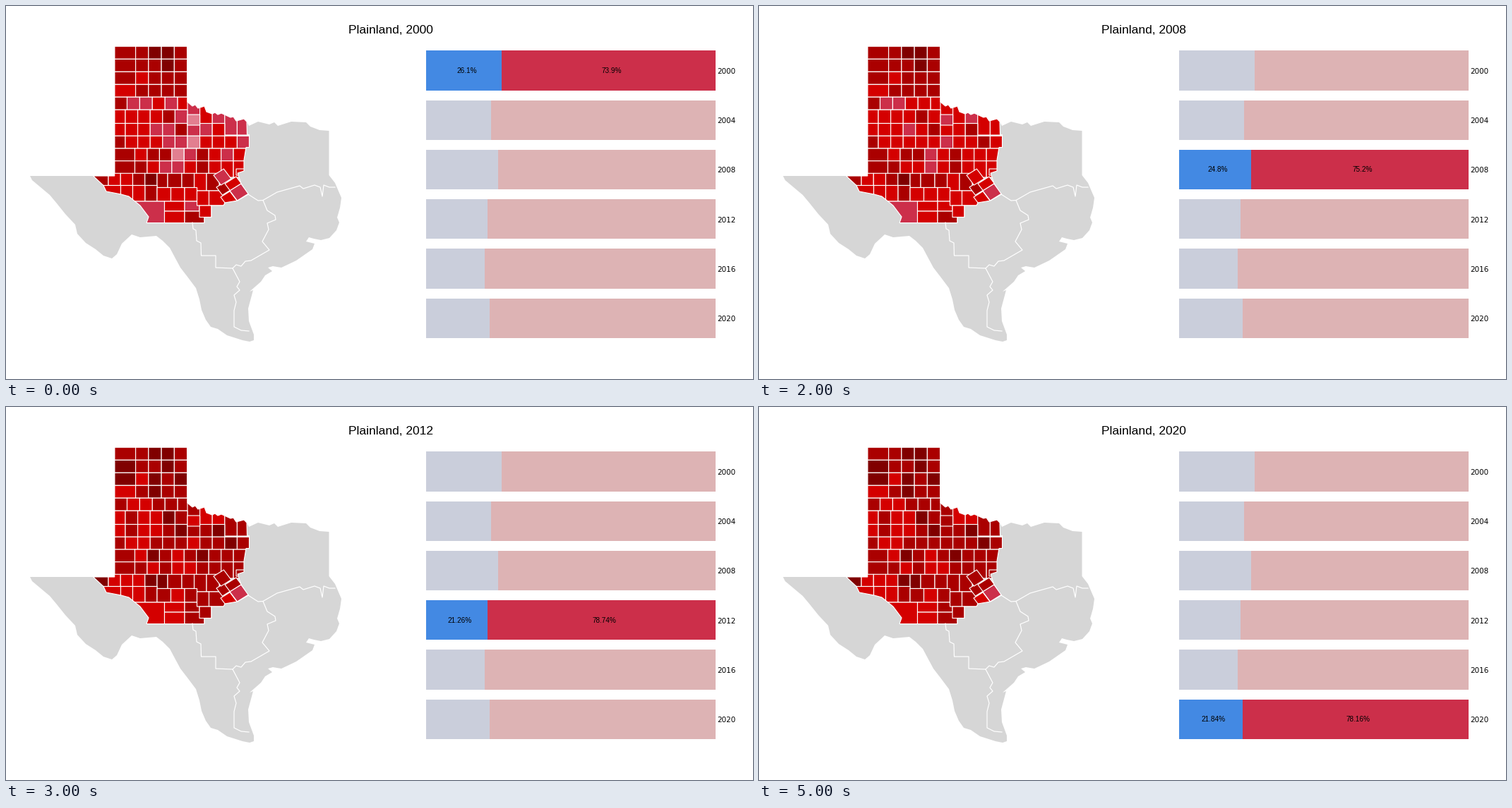
A matplotlib script for the animation above (6 s loop, 1058 by 529 pixels).

```python
import matplotlib.pyplot as plt
from matplotlib.animation import FuncAnimation
from matplotlib.collections import PolyCollection
from matplotlib.patches import Polygon, Rectangle

W, H, DPI = 1058, 529, 64
PX = 72 / DPI  # points per pixel

YEARS = range(2000, 2021, 4)
BLUE_SHARE = [26.1, 22.37, 24.8, 21.26, 20.29, 21.84]
DRIFT = [0, 0.4, 0.4, 0.8, 0.9, 1]  # way from the first shade to the last
SHADES = ["#e27f90", "#cc2f4a", "#d40000", "#aa0000", "#800000"]
BLUE, RED = "#4389e3", "#cc2f4a"
PALE_BLUE, PALE_RED, LAND = "#cacedb", "#ddb3b4", "#d6d6d6"

RIVER = [(257, 136), (264, 142), (268, 140), (272, 145), (281, 142), (284, 150),
         (292, 153), (296, 151), (300, 154), (305, 152), (318, 158), (322, 157),
         (326, 163), (337, 160), (341, 164)]
PANHANDLE = [(153.7, 241), (153.7, 57), (256.5, 57)]
EAST = [(344, 170), (357, 164), (373, 168), (380, 165), (385, 170), (404, 164),
        (425, 165), (431, 171), (444, 176), (457.5, 177), (457.5, 240), (466, 251),
        (475, 272), (473, 286), (469, 300), (472, 307), (468, 318)]
COAST = [(458, 329), (446, 332), (436, 330), (429, 328), (425, 334), (437, 337),
         (434, 345), (411, 361), (390, 371), (378, 369), (371, 371), (377, 376),
         (367, 382), (361, 391), (345, 405), (350, 403), (343, 429), (344, 447),
         (351, 466), (351, 474), (345, 476)]
SOUTH = [(335, 474), (313, 467), (300, 458), (290, 455), (283, 445), (277, 431),
         (274, 416), (269, 400), (257, 384), (247, 371), (240, 358), (232, 343),
         (222, 333), (213, 326), (190, 328), (178, 324), (164, 337), (157, 352),
         (150, 358), (138, 354), (127, 345), (113, 336), (101, 323), (98, 310),
         (84, 295), (72, 280), (62, 268), (37, 247), (34, 241)]

DISTRICT = PANHANDLE + RIVER + [
    (341.5, 182.5), (344.5, 182.5), (344.5, 200.5), (340, 200.5), (337, 218.5),
    (337, 234), (328, 237), (333, 252), (343.5, 267), (328, 276), (310, 279),
    (308, 283), (291, 283), (291, 299.5), (281, 299.5), (281, 307.6),
    (199, 307.6), (202, 299), (190, 283), (174, 270), (163, 267), (142, 263),
    (138, 254.5), (123.5, 241)]

BORDERS = [
    [(343, 267), (357, 276), (364, 275.5), (384, 264), (416, 255), (421, 259),
     (437, 254), (445, 257), (448, 270), (450, 254), (458, 257), (466, 257)],
    [(264, 307), (265, 316), (269, 318), (270, 333), (276, 336), (276.5, 354),
     (297, 354), (297, 371), (321, 372), (326, 367), (333, 369), (339, 362),
     (347, 361), (373, 346), (363, 334), (372, 317), (370, 308), (382, 303),
     (381, 297), (370, 290), (364, 275.5)],
    [(321, 372), (331, 391), (327, 398), (331, 403), (323, 410), (326, 420),
     (323, 432), (323, 455), (333, 460), (344, 461)],
]


def columns(first, second, step):
    """Column edges: one odd first column, then even steps."""
    return [first] + [second + step * k for k in range(11)]


NORTH_COLS = columns(153.7, 183.6, 18.25)
UPPER_COLS = columns(153.7, 171.5, 17.9)
PLAINS_COLS = columns(153.7, 169, 17.6)
CENTRAL_COLS = columns(153.7, 182.5, 17.45)
WEST_COLS = columns(123, 145, 17.25)

# top, bottom, column edges, shades in the first and the last year;
# later rows overlap earlier ones and the district outline trims them all
ROWS = [
    (57, 75.3, NORTH_COLS, "33443", "33443"),
    (75.3, 93.3, NORTH_COLS, "33343", "43343"),
    (93.3, 111.3, NORTH_COLS, "32333", "42434"),
    (111.3, 129.2, NORTH_COLS, "23333", "23433"),
    (129.2, 147.2, UPPER_COLS, "311212", "322333"),
    (130, 183, PLAINS_COLS[6:], "12111", "32233"),
    (147.2, 166.5, PLAINS_COLS, "222231", "232243"),
    (166.5, 184.3, PLAINS_COLS, "222113112", "232234334"),
    (154, 169, PLAINS_COLS[6:], "0", "3"),
    (184.3, 202, PLAINS_COLS, "32221102221", "32233333343"),
    (202, 219.7, CENTRAL_COLS, "3233013212", "3243234333"),
    (219.7, 243, CENTRAL_COLS, "3321123222", "3323223333"),
    (231, 240, [326, 340], "2", "3"),
    (237.3, 254.5, WEST_COLS, "32234", "42224"),
    (237.3, 262, [266.5, 284, 302], "23", "33"),
    (237.3, 257.5, [214, 229, 249, 266.5], "333", "433"),
    (254.5, 277, [137, 162.5, 179.5, 197, 214], "2223", "2223"),
    (257.5, 277, [214, 233.5, 253, 270.5], "222", "323"),
    (277, 308, [179.5, 224.5], "1", "2"),
    (277, 291, [224.5, 253, 274], "21", "23"),
    (291, 308, [224.5, 253, 281], "23", "23"),
    (262, 283, [270.5, 287.5, 310], "22", "33"),
    (283, 299.5, [274, 291], "2", "3"),
]

# Slanted counties: corner, width, length, first and last shade
SLANTED = [
    (298, 257, 0.9, 0.8, 3, 3),
    (294, 240, 0.9, 1, 1, 3),
    (310, 252, 1, 0.7, 2, 3),
    (304, 271, 0.82, 1, 2, 2),
    (317, 262, 1, 1, 1, 1),
]


def slanted(x, y, width, length):
    ux, uy = 16 * width, -10 * width
    vx, vy = 10.5 * length, 14 * length
    return [(x, y), (x + ux, y + uy), (x + ux + vx, y + uy + vy), (x + vx, y + vy)]


def build_counties():
    """Return county polygons and their (first, last) shades."""
    shapes, shades = [], []
    for top, bottom, edges, first, last in ROWS:
        for left, right, a, b in zip(edges, edges[1:], first, last):
            shapes.append([(left, top), (right, top), (right, bottom), (left, bottom)])
            shades.append((int(a), int(b)))
    for *place, a, b in SLANTED:
        shapes.append(slanted(*place))
        shades.append((a, b))
    return shapes, shades


fig = plt.figure(figsize=(W / DPI, H / DPI), dpi=DPI, facecolor="white")
ax = fig.add_axes([0, 0, 1, 1])
ax.set_xlim(0, W)
ax.set_ylim(H, 0)
ax.axis("off")


def label(x, y, text, size, font="Liberation Sans", ha="center"):
    return ax.text(x, y, text, fontsize=size * PX, family=font, ha=ha,
                   va="center_baseline", color="black")


def add_bar(x, y, width):
    return ax.add_patch(Rectangle((x, y), width, 56.2, linewidth=0))


ax.add_patch(Polygon(PANHANDLE + RIVER + EAST + COAST + SOUTH,
                     facecolor=LAND, edgecolor="none"))
for border in BORDERS:
    ax.plot(*zip(*border), color="white", linewidth=1.2 * PX)

shapes, shades = build_counties()
counties = PolyCollection(shapes, edgecolors="white", linewidths=1.15 * PX,
                          joinstyle="round", snap=False)
ax.add_collection(counties, autolim=False)
outline = ax.add_patch(Polygon(DISTRICT, fill=False, edgecolor="white",
                               linewidth=1.15 * PX, zorder=3))
counties.set_clip_path(outline)

title = label(545, 33, "", 17.4)
bars = []
for i, (year, share) in enumerate(zip(YEARS, BLUE_SHARE)):
    top, split = 63.4 + 70.25 * i, 595 + 4.1 * share
    middle = top + 28
    blue = add_bar(595, top, split - 595)
    red = add_bar(split, top, 1005 - split)
    texts = [label((595 + split) / 2 + 4, middle - 0.5, f"{share:g}%", 10),
             label((split + 1005) / 2 + 4, middle - 0.5, f"{100 - share:.4g}%", 10)]
    label(1007.5, middle + 0.5, str(year), 10.4, "DejaVu Sans", "left")
    bars.append((blue, red, texts))


def update(index):
    title.set_text(f"Plainland, {YEARS[index]}")
    counties.set_facecolor([SHADES[round(a + (b - a) * DRIFT[index])]
                            for a, b in shades])
    for i, (blue, red, texts) in enumerate(bars):
        active = i == index
        blue.set_facecolor(BLUE if active else PALE_BLUE)
        red.set_facecolor(RED if active else PALE_RED)
        for text in texts:
            text.set_visible(active)
    return [title, counties]


anim = FuncAnimation(fig, update, frames=len(YEARS), interval=1000,
                     repeat=True, repeat_delay=0, blit=False)
plt.show()
```
